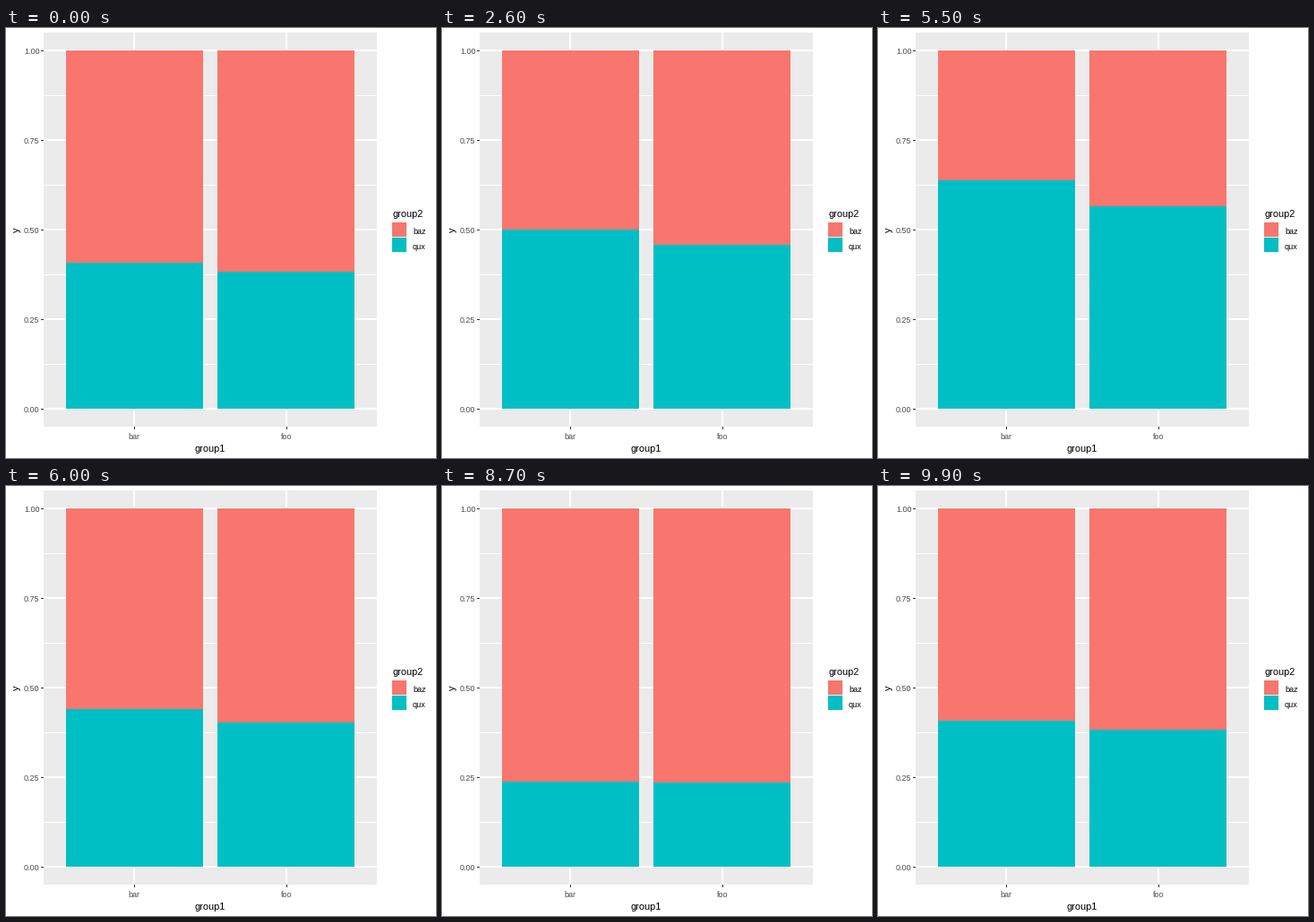
Write a matplotlib script that moves like this. It is 480x480 px and loops after 10000 ms.

```python
import math

import matplotlib.pyplot as plt
from matplotlib.animation import FuncAnimation
from matplotlib.patches import Rectangle

SIZE = 480
DPI = 80
FRAMES = 100
SALMON, TEAL = "#F8766D", "#00BFC4"
TOP, BOTTOM = 25, 425
BAR_X = (67, 236)
BAR_WIDTH = 153

# Height of the boundary between the groups (bar, foo), in pixels from the top
STATES = ((261.55, 271.6), (167.9, 197.0), (330.55, 330.8))
# (first frame, last frame, state before, state after)
TRANSITIONS = ((20, 33, 0, 1), (53, 67, 1, 2), (86, 100, 2, 0))

plt.rcParams["font.family"] = "Liberation Sans"
fig = plt.figure(figsize=(SIZE / DPI, SIZE / DPI), dpi=DPI, facecolor="white")
ax = fig.add_axes([0, 0, 1, 1])
ax.set_xlim(0, SIZE)
ax.set_ylim(SIZE, 0)
ax.axis("off")


def box(x0, y0, x1, y1, color, z=1):
    patch = Rectangle((x0, y0), x1 - x0, y1 - y0, facecolor=color,
                      linewidth=0, antialiased=False, zorder=z)
    return ax.add_patch(patch)


def label(x, y, text, px, color="black", **kwargs):
    kwargs.setdefault("va", "baseline")
    ax.text(x, y, text, fontsize=px * 72 / DPI, color=color, zorder=5, **kwargs)


def draw_panel():
    box(42, 5, 414, 445, "#EBEBEB", 0)
    for y in (75, 175, 275, 375):
        box(42, y, 414, y + 1, "white")
    for i in range(5):
        y = BOTTOM - 100 * i
        box(42, y - 1, 414, y + 1, "white")
        box(39, y, 42, y + 1, "#333333")
        label(37.5, y + 4, f"{i / 4:.2f}", 9, "#4D4D4D", ha="right")
    for x, name in ((143, "bar"), (313, "foo")):
        box(x - 1, 5, x + 1, 445, "white")
        box(x, 445, x + 1, 448, "#333333")
        label(x, 459, name, 9, "#4D4D4D", ha="center")
    label(228, 473, "group1", 11, ha="center")
    label(12, 225, "y", 11, ha="center", va="center", rotation=90)


def draw_legend():
    label(431, 211, "group2", 11)
    box(431, 217, 448, 251, "#F2F2F2", 0)
    for y, color, name in ((217, SALMON, "baz"), (234, TEAL, "qux")):
        box(431, y, 447, y + 16, color)
        label(454, y + 13, name, 9)


def cubic_in_out(t):
    return 4 * t ** 3 if t < 0.5 else 1 - 4 * (1 - t) ** 3


def boundaries(frame):
    current = STATES[0]
    for start, end, before, after in TRANSITIONS:
        if frame >= start:
            p = cubic_in_out(min(1, (frame - start) / (end - start)))
            current = [a + (b - a) * p
                       for a, b in zip(STATES[before], STATES[after])]
    return [math.floor(y + 0.5) for y in current]


draw_panel()
draw_legend()
for x in BAR_X:
    box(x, TOP, x + BAR_WIDTH, BOTTOM, SALMON, 2)
lower = [box(x, TOP, x + BAR_WIDTH, BOTTOM, TEAL, 3) for x in BAR_X]


def update(frame):
    for patch, y in zip(lower, boundaries(frame)):
        patch.set_y(y)
        patch.set_height(BOTTOM - y)
    return lower


anim = FuncAnimation(fig, update, frames=FRAMES, interval=100,
                     repeat=True, repeat_delay=0, blit=False)
plt.show()
```
